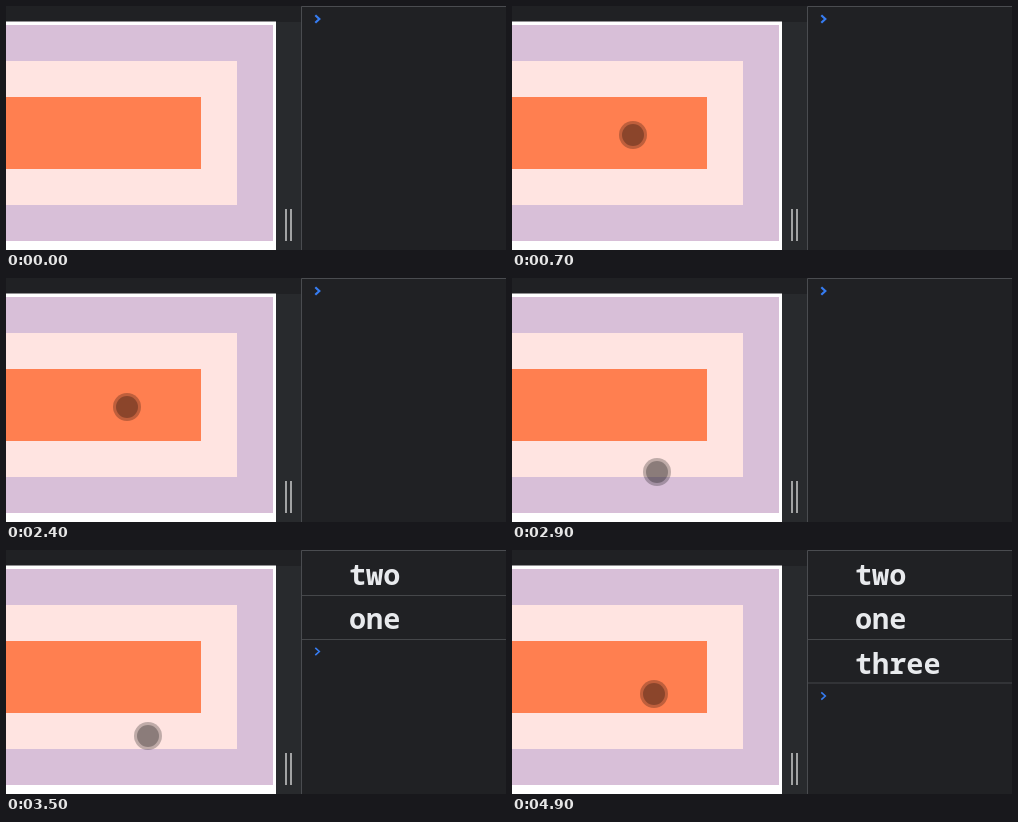
Recreate the animation shown at these times as an HTML page. Size 500x244 px, loop 5900 ms.

```html
<!DOCTYPE html>
<html>
<head>
<meta charset="utf-8">
<style>
  html, body { margin: 0; width: 100%; height: 100%; overflow: hidden; background: #202124; }
  svg { display: block; width: 500px; height: 244px; }
  text { font: bold 28.5px "Noto Sans Mono", "DejaVu Sans Mono", monospace; fill: #e8eaed; }
</style>
</head>
<body>
<svg viewBox="0 0 500 244">
  <rect width="500" height="244" fill="#202124"/>
  <rect x="270" y="16" width="25" height="228" fill="#282a2d"/>
  <rect y="15.5" width="270" height="229" fill="#fff"/>
  <rect y="19" width="267" height="216" fill="thistle"/>
  <rect y="55" width="231" height="144" fill="mistyrose"/>
  <rect y="91" width="195" height="72" fill="coral"/>
  <path d="M280 203v32M285 203v32" stroke="#a2a3a4" stroke-width="2"/>
  <path d="M295.5 244V.5H500" fill="none" stroke="#4a4c50"/>
  <g id="log"></g>
  <path id="prompt" d="M-2.2-3.7L1.8 0L-2.2 3.7" fill="none" stroke="#367cf1"/>
  <g id="cursor">
    <circle r="14" fill-opacity=".25"/>
    <circle r="11" fill-opacity=".27"/>
  </g>
</svg>
<script>
const LOOP = 5900, STEP = 100;
const [log, prompt, cursor] = ['log', 'prompt', 'cursor'].map(id => document.getElementById(id));

// time, x, y
const path = [
  [100, 140, 236], [600, 121, 129], [2400, 121, 129], [2900, 145, 194],
  [3100, 142, 186], [3700, 142, 186], [4100, 142, 144], [LOOP, 142, 144]
];
// time, console lines
const output = [
  [0, []], [1200, ['three', 'two', 'one']], [2400, []],
  [3500, ['two', 'one']], [4700, ['two', 'one', 'three']]
];
const promptY = [13, 57, 101.5, 146];
const ruleY = [45.5, 89.5, 133];

const ease = p => p * p * (3 - 2 * p);

function cursorAt(t) {
  const i = path.findIndex(k => k[0] > t);
  const [t0, x0, y0] = path[i - 1], [t1, x1, y1] = path[i];
  const p = ease((t - t0) / (t1 - t0));
  return [x0 + (x1 - x0) * p, y0 + (y1 - y0) * p];
}

let shown;
function showLines(lines) {
  if (lines === shown) return;
  shown = lines;
  log.innerHTML = lines.map((word, i) =>
    `<text x="343" y="${35 + i * 44.4}">${word}</text>
     <path d="M296 ${ruleY[i]}H500" stroke="#45474a"/>`).join('');
  prompt.setAttribute('transform', `translate(311.5 ${promptY[lines.length]})`);
  prompt.setAttribute('stroke-width', lines.length ? 1.6 : 2.2);
}

function draw(now) {
  const t = Math.floor(now % LOOP / STEP) * STEP;
  showLines(output.filter(o => o[0] <= t).pop()[1]);
  const visible = t >= path[0][0];
  cursor.setAttribute('visibility', visible ? 'visible' : 'hidden');
  if (visible) cursor.setAttribute('transform', `translate(${cursorAt(t)})`);
}

const start = performance.now();
function tick() {
  draw(performance.now() - start);
  requestAnimationFrame(tick);
}
tick();
</script>
</body>
</html>
```
